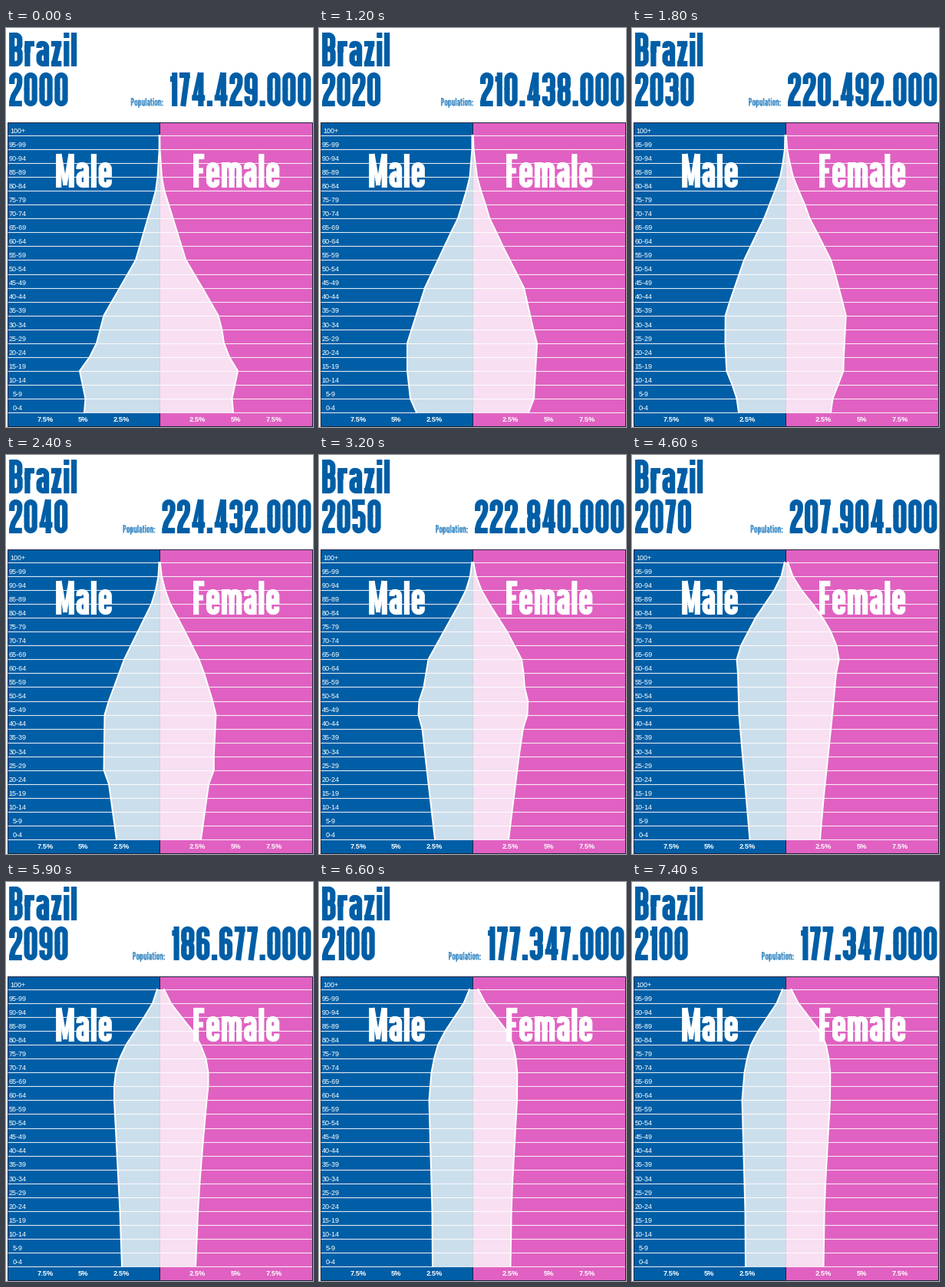
A matplotlib script that plays this animation: 400x520 px, repeating every 7500 ms.

```python
import numpy as np
import matplotlib.pyplot as plt
from matplotlib.animation import FuncAnimation
from matplotlib.patches import PathPatch, Polygon, Rectangle
from matplotlib.path import Path

W, H, DPI = 400, 520, 100
PX = 72 / DPI
BLUE, PINK, SOFT, DARK = "#005ea6", "#e061c1", "#4a94ca", "#1c2340"
MID, TOP, BASE = 200, 140, 501
ROWS = np.linspace(BASE, TOP, 21)
HOLD, FRAMES = 6, 75

# ---- population curves: half-widths in pixels by five-year age group ----
AGES = np.arange(21)
GAP_AGES = (0, 3, 6, 9, 12, 15, 17, 20)


def pyramid(male, gap):
    """Male curve from its bends; female curve as male plus a gap."""
    m = np.interp(AGES, *zip(*male))
    f = np.maximum(m + np.interp(AGES, GAP_AGES, gap), 0)
    return np.array([m, f])


def between(a, b):
    """Decade between two others: cohorts move up two groups in ten years."""
    mid = (a + b) / 2
    mid[:, 2:15] = (a[:, :13] + b[:, 4:17]) / 2
    mid[:, :2] = b[:, 2:4]
    return mid


p2000 = pyramid([(0, 98), (1, 96.5), (3, 104), (4, 91), (5, 82), (7, 72.5),
                 (11, 31), (15, 10), (16, 5), (17, 2.5), (19, 0.3)],
                (-2, -2, 4, 4, 3, 2, 0.5, 0))
p2020 = pyramid([(0, 73), (1, 81), (3, 85), (5, 85), (9, 62), (13, 28),
                 (14, 19), (16, 8), (17, 3.5), (19, 0.5)],
                (0, -3, 0, 5, 3, 3.5, 2.5, 0.3))
p2040 = pyramid([(0, 56), (4, 66), (5, 72.5), (9, 71.5), (10, 66), (13, 46),
                 (17, 10.5), (18, 5), (19, 1.5), (20, 0.5)],
                (-2, -2, -1.5, 2, 5.5, 5, 3.5, 0.3))
p2050 = pyramid([(0, 49), (6, 61.5), (8, 65.5), (9, 70.5), (10, 69.5), (11, 63.5),
                 (13, 57.5), (17, 17.5), (18, 8.5), (19, 3), (20, 0.7)],
                (-2, -1.5, -1, 1, 6, 7.5, 4.5, 0.5))
p2070 = pyramid([(0, 46.5), (9, 60.5), (12, 62), (13, 63.5), (14, 58), (16, 39),
                 (18, 14.5), (19, 5.5), (20, 1.2)],
                (-1.5, -1.5, -0.5, 0.5, 4, 10.5, 8.5, 1.8))
p2090 = pyramid([(0, 49), (4, 51.5), (12, 59), (13, 59), (14, 57), (15, 52),
                 (16, 43.5), (18, 20), (19, 9), (20, 3)],
                (-2, -1.5, -1, 0.5, 2.5, 8.5, 11.5, 3))
p2100 = pyramid([(0, 52), (4, 52.5), (12, 56.5), (14, 53.5), (15, 50), (16, 45),
                 (17, 35.5), (19, 11.5), (20, 4)],
                (-2.5, -2, -1.5, 0, 1.5, 6.5, 9, 3.5))

PAGES = [
    ("2000", "174.429.000", p2000),
    ("2010", "194.946.000", between(p2000, p2020)),
    ("2020", "210.438.000", p2020),
    ("2030", "220.492.000", between(p2020, p2040)),
    ("2040", "224.432.000", p2040),
    ("2050", "222.840.000", p2050),
    ("2060", "216.689.000", between(p2050, p2070)),
    ("2070", "207.904.000", p2070),
    ("2080", "197.294.000", between(p2070, p2090)),
    ("2090", "186.677.000", p2090),
    ("2100", "177.347.000", p2100),
]

# ---- condensed gothic lettering, built from strokes ----
CAP, XH = 44, 33
BOLD, THIN, SPACE = 7.2, 5, 2.4
L, R = 3.7, 13.8                        # left and right stems
T, X, B, M = CAP - 3.5, XH - 3.5, 3.5, 22   # cap, x-height, base, middle


def stem(x, top=CAP, bottom=0):
    return [(x, bottom), (x, top)]


def bar(y, right, left=0.2):
    return [(left, y), (right, y)]


def ring(top, bottom=B):
    y = (top + bottom) / 2
    return [(L, y), (L, top), (R, top), (R, bottom), (L, bottom), (L, y + 1)]


def bowl(top, bottom, x=R):
    return [(L, top), (x, top), (x, bottom), (L, bottom)]


def arch(left, right):
    return [(left, 22), (left, X), (right, X), (right, 0)]


def turn(strokes, height):
    return [[(L + R - x, height - y) for x, y in s] for s in strokes]


SIX = [[(R, 31), (R, T), (L, T), (L, B), (R, B), (R, 25), (L, 25)]]
EN = [stem(L, XH), arch(L, R)]

# character: (width, strokes)
GLYPHS = {
    "0": (17.5, [ring(T)]),
    "1": (9.6, [stem(6), bar(35.5, 6)]),
    "2": (17, [[(L, 29), (L, T), (R, T), (R, 27), (L + 0.3, 11), (L + 0.3, 0)],
               bar(B, 16.8)]),
    "3": (17.5, [[(L, 31), (L, T), (R, T), (R, M + 0.5), (6, M + 0.5)],
                 [(6, M + 0.5), (R, M + 0.5), (R, B), (L, B), (L, 13)]]),
    "4": (17.2, [stem(11.8), bar(11, 17.2)]),
    "5": (17.5, [bar(T, 16.4), stem(L, CAP, 19),
                 [(L, 25.5), (R, 25.5), (R, B), (L, B), (L, 12)]]),
    "6": (17.5, SIX),
    "7": (14, [bar(T, 14), [(10.4, T), (5, 0)]]),
    "8": (17.5, [ring(T, M + 0.5), ring(M + 0.5)]),
    "9": (17.5, turn(SIX, CAP)),
    ".": (7.4, [stem(L, 7.4)]),
    ":": (7.4, [stem(L, 7.4), stem(L, 28, 20.6)]),
    "B": (17.8, [stem(L), bowl(T, M + 0.5), bowl(M + 0.5, B, R + 0.3)]),
    "F": (14.5, [stem(L), bar(T, 14.4), bar(M, 13)]),
    "M": (24, [stem(L), stem(20.3)]),
    "P": (17.5, [stem(L), bowl(T, 20)]),
    "a": (16.9, [[(L, 24), (L, X), (13.2, X), (13.2, 0)], bowl(18, B, 13.2)[::-1],
                 [(13.2, 18), (L, 18), (L, B), (13.2, B)]]),
    "e": (17.5, [[(R, 10.5), (R, B), (L, B), (L, X), (R, X), (R, 14)],
                 bar(17, R, L)]),
    "i": (7.4, [stem(L, XH), stem(L, CAP, 37)]),
    "l": (7.4, [stem(L)]),
    "m": (26.6, [stem(L, XH), arch(L, 13.3), arch(13.3, 22.9)]),
    "n": (17.5, EN),
    "o": (17.5, [ring(X)]),
    "p": (17.5, [stem(L, XH, -10), ring(X)]),
    "r": (12.8, [stem(L, XH), [(L, 18), (L, X), (12.8, X)]]),
    "t": (10.5, [[(4, 41), (4, B), (10.5, B)], bar(X, 10.5)]),
    "u": (17.5, turn(EN, XH)),
    "z": (14, [bar(X, 13.6), bar(B, 13.6), [(10, X), (4, B)]]),
}
GLYPHS["a"] = (16.9, [GLYPHS["a"][1][0], GLYPHS["a"][1][2]])

# lighter diagonals of two characters
FINE = {
    "4": [[(2.7, 9), (10.2, CAP)]],
    "M": [[(5, CAP), (12, 3)], [(19, CAP), (12, 3)]],
}


def trace(pts, radius=5):
    """Polyline with rounded corners as (vertices, codes)."""
    pts = np.array(pts, float)
    verts, codes = [pts[0]], [Path.MOVETO]
    for a, p, b in zip(pts, pts[1:], pts[2:]):
        la, lb = np.hypot(*(a - p)), np.hypot(*(b - p))
        r = min(radius, la / 2, lb / 2)
        u, v = (a - p) * r / la, (b - p) * r / lb
        verts += [p + u, p + 0.45 * u, p + 0.45 * v, p + v]
        codes += [Path.LINETO] + [Path.CURVE4] * 3
    verts.append(pts[-1])
    codes.append(Path.LINETO)
    return verts, codes


def text_width(text, k=1):
    return k * (sum(GLYPHS[c][0] + SPACE for c in text) - SPACE)


def text_path(text, x, base, k=1, fine=False):
    verts, codes = [(0, 0)], [Path.MOVETO]
    for c in text:
        width, strokes = GLYPHS[c]
        for s in FINE.get(c, []) if fine else strokes:
            vs, cs = trace(s)
            verts += [(x + k * vx, base - k * vy) for vx, vy in vs]
            codes += cs
        x += k * (width + SPACE)
    return Path(verts, codes)


class Lettering:
    """A line of lettering that can be rewritten and moved."""

    def __init__(self, color, base, k=1):
        self.base, self.k = base, k
        self.parts = [
            ax.add_patch(PathPatch(Path([(0, 0)]), fill=False, ec=color,
                                   lw=w * k * PX, capstyle="butt",
                                   joinstyle="round", zorder=6))
            for w in (BOLD, THIN)]

    def write(self, text, x):
        for part, fine in zip(self.parts, (False, True)):
            part.set_path(text_path(text, x, self.base, self.k, fine))


# ---- stage ----
fig = plt.figure(figsize=(W / DPI, H / DPI), dpi=DPI, facecolor="white")
ax = fig.add_axes([0, 0, 1, 1])
ax.set_xlim(0, W)
ax.set_ylim(H, 0)
ax.axis("off")

for x, w, color in ((1.5, MID - 1.5, BLUE), (MID, 198.5, PINK)):
    ax.add_patch(Rectangle((x, 122.5), w, 396, fc=color, ec=DARK, lw=PX))

shapes, edges = [], []
for _ in range(2):
    shapes.append(ax.add_patch(Polygon([(MID, TOP), (MID, BASE)], fc="white",
                                       alpha=0.8, lw=0, zorder=3)))
    edges += ax.plot([], [], color="white", lw=2 * PX, zorder=4)

ax.hlines(ROWS, 2, 398, color="white", lw=1.1 * PX, alpha=0.88, zorder=4)

for i, y in enumerate(ROWS):
    label = "100+" if i == 20 else f"{5 * i}-{5 * i + 4}"
    ax.text(15, y - 3.2, label, color="white", family="Liberation Sans",
            size=9 * PX, ha="center", va="baseline", zorder=5)

for share in (2.5, 5, 7.5):
    for side in (-1, 1):
        ax.text(MID + side * share * 19.85, 513.3, f"{share:g}%", color="white",
                family="Liberation Sans", weight="bold", size=9.3 * PX,
                ha="center", va="baseline", zorder=5)

Lettering(BLUE, 50).write("Brazil", 4)
Lettering("white", 208).write("Male", 65)
Lettering("white", 208).write("Female", 244)
year_text = Lettering(BLUE, 102)
total_text = Lettering(BLUE, 102)
caption = Lettering(SOFT, 101.5, 0.235)


def update(frame):
    year, total, curves = PAGES[min(frame // HOLD, len(PAGES) - 1)]
    left = 397.5 - text_width(total)
    year_text.write(year, 4)
    total_text.write(total, left)
    caption.write("Population:", left - 9 - text_width("Population:", caption.k))
    for side, curve, shape, edge in zip((-1, 1), curves, shapes, edges):
        xs = MID + side * curve
        shape.set_xy([(MID, BASE), *zip(xs, ROWS), (MID, TOP)])
        edge.set_data(xs, ROWS)
    return shapes + edges


anim = FuncAnimation(fig, update, frames=FRAMES, interval=100, repeat=True,
                     repeat_delay=0, blit=False)
plt.show()
```
